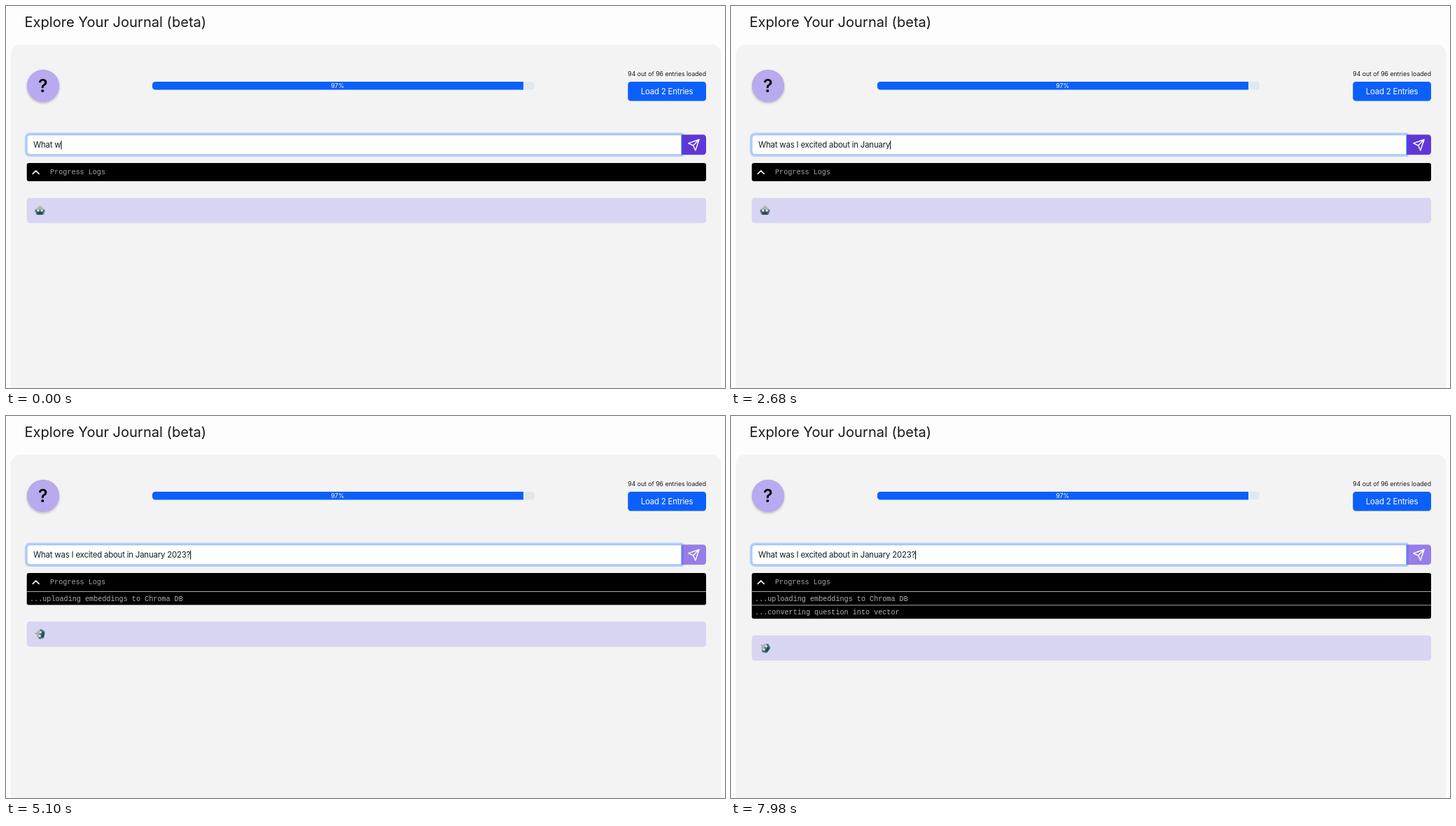
Write an HTML page that moves like this. It is 1027 by 545 pixels and loops after 8000 ms.

```html
<!DOCTYPE html>
<html lang="en">
<head>
<meta charset="utf-8">
<title>Explore Your Journal</title>
<style>
  html, body { margin: 0; width: 100%; height: 100%; overflow: hidden; background: #fdfdfe; }
  svg { display: block; width: 1027px; height: 545px; }
  text { font-family: Inter, "Open Sans", sans-serif; font-optical-sizing: none; fill: #17191c; white-space: pre; }
  .title { font-size: 20.1px; }
  .body { font-size: 11.4px; letter-spacing: -.0165em; }
  .small { font-size: 8.7px; }
  .log { font: 10.13px "Liberation Mono", "Courier New", monospace; fill: #b4b4b4; }
  .line { fill: none; stroke: #fff; stroke-linecap: round; stroke-linejoin: round; }
  .light { fill: #fff; }
</style>
</head>
<body>
<svg viewBox="0 0 1027 545">
  <defs>
    <filter id="shadow" x="-30%" y="-30%" width="160%" height="170%">
      <feDropShadow dx="0" dy="1.5" stdDeviation="1.8" flood-opacity=".25"/>
    </filter>
  </defs>

  <rect width="1027" height="545" fill="#fdfdfe"/>
  <text class="title" x="26.5" y="30">Explore Your Journal (beta)</text>
  <rect x="7" y="55" width="1014.5" height="520" rx="14" fill="#f3f3f3"/>

  <circle cx="53" cy="114" r="23.2" fill="#b9a9ee" filter="url(#shadow)"/>
  <text x="52.8" y="122.6" text-anchor="middle" font-size="25" font-weight="600" style="fill:#000">?</text>

  <rect x="209" y="108" width="546" height="11.6" rx="4.3" fill="#e1e8ec"/>
  <path d="M739 108H213.3a4.3 4.3 0 0 0-4.3 4.3v3a4.3 4.3 0 0 0 4.3 4.3H739z" fill="#0b60fb"/>
  <text class="small light" x="473.7" y="117" text-anchor="middle">97%</text>

  <text class="small" x="1000" y="100" text-anchor="end">94 out of 96 entries loaded</text>
  <rect x="888.3" y="108" width="111.7" height="27.6" rx="4.3" fill="#0b60fb"/>
  <text class="body light" x="944" y="126" text-anchor="middle">Load 2 Entries</text>

  <path id="send" d="M964 183.5h31.7a4.3 4.3 0 0 1 4.3 4.3v20.2a4.3 4.3 0 0 1-4.3 4.3H964z"/>
  <path class="line" stroke-width="1.9" transform="translate(973.2 189) scale(.77)"
        d="M22 2 11 13M22 2l-7 20-4-9-9-4z"/>

  <path d="M965 183.5H34a4.3 4.3 0 0 0-4.3 4.3v20.2a4.3 4.3 0 0 0 4.3 4.3H965z"
        fill="none" stroke="#0d6efd" stroke-opacity=".27" stroke-width="5.6" stroke-linejoin="round"/>
  <path d="M964.6 183.9H34a4 4 0 0 0-4 4v20a4 4 0 0 0 4 4H964.6z" fill="#fff" stroke="#86b4f8" stroke-width=".9"/>
  <text class="body" id="question" x="39" y="202.2"></text>
  <rect id="caret" y="192" width="1" height="12.5" fill="#000"/>

  <rect id="logs" x="29.7" y="224" width="970.3" rx="3.2"/>
  <path class="line" stroke-width="1.7" d="M38.3 239.4 42.7 235l4.4 4.4"/>
  <text class="log" x="63" y="240.2" style="fill:#a6a6a6">Progress Logs</text>
  <g class="entry">
    <rect x="29.7" y="250" width="970.3" height=".9" fill="#bcbcae"/>
    <text class="log" x="34" y="263.6">...uploading embeddings to Chroma DB</text>
  </g>
  <g class="entry">
    <rect x="29.7" y="269.5" width="970.3" height=".9" fill="#bcbcc6"/>
    <text class="log" x="34" y="283.2">...converting question into vector</text>
  </g>

  <g id="answer">
    <rect x="29.7" y="273.7" width="970.3" height="36" rx="4.3" fill="#d8d5f3"/>
    <g transform="translate(48.5 291.5)">
      <g id="robot">
        <path d="M-.6-6.5h1.2v2.5h-1.2z" fill="#7b8586"/>
        <circle cy="-6" r="1.1" fill="#d0a83c"/>
        <path d="M-5.6-.5a5.6 4.6 0 0 1 11.2 0z" fill="#a3b5b4"/>
        <path d="M-7-1h2v3.6h-2zM5-1h2v3.6H5z" fill="#7d7470"/>
        <path d="M-6-.8H6V3.4Q5.2 6.6 3 6.6H-3Q-5.2 6.6-6 3.4z" fill="#44757f"/>
        <circle cx="-2.7" cy=".2" r="1.5" fill="#e8f2ee"/>
        <circle cx="2.7" cy=".2" r="1.5" fill="#e8f2ee"/>
        <path d="M-4 2.8h8l-1 3h-6z" fill="#29464f"/>
      </g>
    </g>
  </g>
</svg>
<script>
  const LOOP = 8000, SENT = 4020, TURN = 1390, ROW = 19.6;
  const ENTRY_TIMES = [SENT, 7000];
  const QUESTION = "What was I excited about in January 2023?";
  const TYPING = [[0, 6], [900, 15], [2620, 35], [3300, 41]]; // [ms, letters]

  const el = id => document.getElementById(id);
  const [question, caret, send, logs, answer, robot] =
    ["question", "caret", "send", "logs", "answer", "robot"].map(el);
  const entries = [...document.querySelectorAll(".entry")];

  function lettersAt(t) {
    for (let i = 1; i < TYPING.length; i++) {
      const [t0, n0] = TYPING[i - 1], [t1, n1] = TYPING[i];
      if (t < t1) return Math.floor(n0 + (n1 - n0) * (t - t0) / (t1 - t0));
    }
    return QUESTION.length;
  }

  function draw(t) {
    const typed = QUESTION.slice(0, lettersAt(t));
    if (question.textContent !== typed) question.textContent = typed;
    caret.setAttribute("x", 39 + question.getComputedTextLength());

    const rows = ENTRY_TIMES.filter(at => t >= at).length;
    entries.forEach((entry, i) => entry.setAttribute("visibility", i < rows ? "visible" : "hidden"));
    logs.setAttribute("height", 26 + rows * ROW);
    answer.setAttribute("transform", `translate(0 ${rows * ROW})`);

    const sent = t >= SENT;
    send.setAttribute("fill", sent ? "#977de8" : "#6036d9");
    robot.setAttribute("transform", `rotate(${sent ? (t - SENT) / TURN * 360 : 0})`);
  }

  const start = performance.now();
  function tick() {
    draw((performance.now() - start) % LOOP);
    requestAnimationFrame(tick);
  }
  tick();
</script>
</body>
</html>
```
